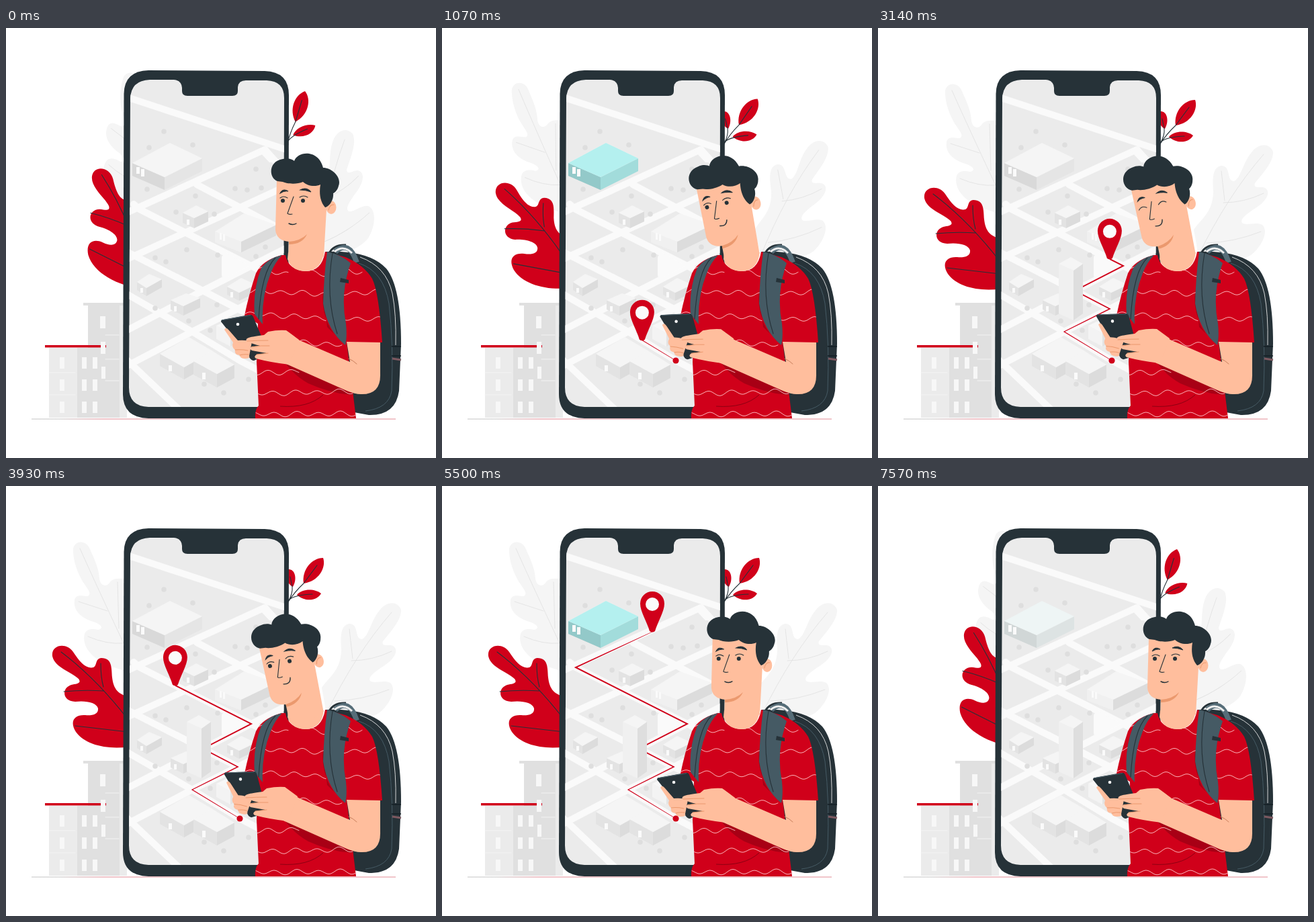
Animation, 640 px wide and 640 px high, one loop 7780 ms. Source, as an HTML page:

```html
<!DOCTYPE html>
<html lang="en">
<head>
<meta charset="utf-8">
<title>City map traveller</title>
<style>
html, body { margin: 0; width: 100%; height: 100%; overflow: hidden; background: #fff; }
svg { display: block; width: 100vw; height: 100vh; }
.red { fill: #d0001a; } .dark { fill: #263238; } .slate { fill: #455a64; }
.skin { fill: #ffbe9d; } .pale { fill: #f5f5f5; }
.ink, .vein, .wave, .road { fill: none; stroke-linecap: round; stroke-linejoin: round; }
.ink { stroke: #263238; stroke-width: 1.1; }
.vein { stroke: #e3e3e3; stroke-width: .9; }
.wave { stroke: #ffc4c8; stroke-width: .9; }
.road { stroke: #fafafa; stroke-width: 10; }
.crease { fill: none; stroke: #eb996e; stroke-width: 1; stroke-linecap: round; }
</style>
</head>
<body>
<svg viewBox="0 0 640 640">
<defs>
  <clipPath id="screenClip"><path id="screenShape" d="M214 77L250 77Q261 78 262 89V94Q262 101 270 101H337Q345 101 345 94V88Q346 78 357 78H388Q414 79 414 104L413 564H212Q183 563 183 535L185 105Q186 78 214 77Z"/></clipPath>
  <clipPath id="shirtClip"><path id="shirtShape" d="M410 338Q381 346 372 365Q361 398 355 428L375 440L373 497L376 562Q370 568 371 581H521L516 540L507 468L560 468Q555 393 545 373Q532 352 505 341L475 333Q470 362 446 362Q420 360 416 338Z"/></clipPath>
  <mask id="trim" maskUnits="userSpaceOnUse" width="640" height="640">
    <polyline id="trimLine" fill="none" stroke="#fff" stroke-width="7" stroke-miterlimit="8"/>
  </mask>
  <linearGradient id="groundInk"><stop offset=".08" stop-color="#c4c4c4"/><stop offset=".2" stop-color="#e38b95"/><stop offset="1" stop-color="#e38b95"/></linearGradient>
</defs>

<g id="greyLeft">
  <path class="pale" d="M100 98C98 82 117 78 124 92C132 110 138 122 139 138C141 150 150 150 154 144C160 136 168 138 180 138L215 300C190 275 170 274 155 268C130 258 112 240 117 220C120 212 130 212 137 214C146 212 142 206 130 202C110 196 100 184 102 170C104 160 114 164 122 164C128 160 122 154 114 142C106 128 101 114 100 98Z"/>
  <path class="vein" d="M110 93Q140 160 185 255M108 172L151 186M122 224Q150 236 174 234M166 143L168 212"/>
</g>
<g id="greyRight">
  <path class="pale" d="M478 345L470 300C480 285 498 275 499 245C498 225 497 207 511 205C526 205 518 228 530 228C540 224 543 200 556 185C566 172 582 170 588 184C589 200 572 217 561 231C558 240 570 235 576 238C586 244 578 258 562 268C550 276 538 284 542 290C548 295 562 288 572 293C582 302 572 325 555 338C535 350 510 345 478 345Z"/>
  <path class="vein" d="M574 188Q520 250 476 340M511 213L516 257M574 246Q545 260 514 260M570 303Q530 319 489 320"/>
</g>

<g id="city">
  <path fill="#e0e0e0" d="M115 409H180V413H170V580H122V413H115Z"/>
  <path fill="#ebebeb" d="M169 413H180V580H169ZM64 476H106V580H64Z"/>
  <path fill="#e0e0e0" d="M106 476H148V580H106Z"/>
  <path class="vein" style="stroke:#f5f5f5" d="M64 513H103M64 546H103M148 493H168M148 457H168M148 525H168"/>
  <path class="red" d="M58 472H149V475.500H58Z"/>
</g>
<path fill="none" stroke="url(#groundInk)" d="M38 582L580 582.01"/>

<g id="sprig">
  <path class="red" d="M443 145C440 125 455 107 472 107C477 122 465 142 443 145ZM433 162C442 152 460 153 469 160C463 171 445 173 433 162ZM427 150C416 145 413 125 421 124C430 124 434 138 427 150Z"/>
  <path class="ink" d="M419 174Q429 158 443 145L463 118M423 168Q432 162 456 161M420 172Q427 160 426 150L423 135"/>
</g>
<g id="redLeaf">
  <path class="red" d="M69 253C67 236 90 232 100 247C108 259 118 273 130 270C136 268 132 257 142 256C158 256 157 270 158 285C160 302 167 311 185 314L200 385C160 395 120 388 104 366C94 350 102 340 118 341C128 342 138 340 137 331C135 322 118 319 103 321C84 321 82 301 97 296C105 294 113 294 108 287C98 277 72 270 69 253Z"/>
  <path class="ink" d="M82 247Q135 287 182 348M86 306Q115 303 146 305M103 357L190 367M141 264Q141 285 145 299"/>
</g>

<path class="dark" d="M212 63L385 64Q421 65 421 100L420 581H212Q174 580 174 545L175.500 98Q176 64 212 63Z"/>
<use href="#screenShape" fill="#ebebeb"/>
<g clip-path="url(#screenClip)">
  <path class="road" d="M180 103L420 182M180 275L385 181L425 224M190 262L199 270L420 382M284 233L420 305M180 344L355 264L420 234M180 450L293 391L365 354L420 326M180 333L293 391L345 418L380 436M180 503L277 452L345 418L420 380M180 396L277 452L348 495L390 517M180 494L262 572M326 342V368"/>
  <path fill="#fafafa" d="M326 334L362 354L326 372ZM375 182L388 176L408 200H392Z"/>
  <g id="trees" fill="#dedede"></g>
  <g id="houses"></g>
  <g id="glow"></g>
  <g id="doors" fill="#fafafa"></g>
</g>
<g class="red">
  <g mask="url(#trim)"><polygon id="route"/></g>
  <circle id="dot" cx="348" cy="495"/>
  <g id="pin">
    <path d="M-4-1Q0 2 4-1C8-15 18-30 18-42A18 18 0 0 0-18-42C-18-30-8-15-4-1Z"/>
    <circle cy="-41" r="10" fill="#fafafa"/>
  </g>
</g>
<g id="tower"></g>

<g id="backpack">
  <path class="dark" d="M475 333Q540 330 566 358Q588 385 588 470L585 540Q580 577 540 576L518 572L500 450Z"/>
  <path fill="none" stroke="#455a64" d="M525 350Q562 362 570 410Q577 470 574 540Q570 566 535 570"/>
  <path fill="none" stroke="#e8e8e8" stroke-width=".9" d="M527 341Q566 355 575 395Q581 425 580 472"/>
  <path d="M574 474H588M574 488H588" stroke="#151f24" stroke-width="1.500"/>
  <path d="M575 492L588 494" stroke="#7d5960" stroke-width="3"/>
  <path fill="none" stroke="#263238" stroke-width="3" d="M481 335Q488 322 506 323"/>
  <path fill="none" stroke="#566d78" stroke-width="8" d="M490 333Q511 315 522 349"/>
  <path fill="none" stroke="#eeeeee" stroke-width="3" d="M489 333Q502 322 515 335"/>
</g>
<use href="#shirtShape" class="red"/>
<g clip-path="url(#shirtClip)">
  <path fill="#a80015" d="M412 494L520 538V546Q488 546 450 529Q428 517 412 494ZM472 390Q466 440 505 472L478 445Z"/>
  <g id="waves" class="wave"></g>
  <path fill="none" stroke="#8c0012" d="M408 563Q450 566 472 546"/>
</g>
<path class="slate" d="M411 338Q391 342 380 357Q367 390 370 426L382 441Q380 400 394 365Q400 349 411 338ZM478 333Q473 370 472 410Q478 450 505 472Q508 460 506 440Q497 395 513 350Q500 338 478 333Z"/>
<path class="ink" d="M401 342Q380 362 376 433M486 335Q475 400 493 455"/>
<path class="dark" d="M498 372L510 375V380L497 378Z"/>

<path class="skin" d="M420 334L419 344Q425 362 447 362Q470 360 473 334Z"/>
<g id="head">
  <path class="skin" d="M403 226L401 300Q402 316 421 318L420 345Q445 358 473 340L477 270L472 226Z"/>
  <ellipse class="skin" cx="484" cy="267" rx="7.500" ry="10"/>
  <path class="crease" d="M480 271Q482 262 488 263"/>
  <path fill="#eb996e" d="M421 318Q438 317 448 307Q441 322 421 322Z"/>
  <path class="dark" d="M404 228C390 222 391 198 412 195C420 193 427 196 429 198C434 183 465 180 472 208C485 208 500 222 495 235C494 240 490 245 487 246C488 256 481 266 475 267C467 258 466 245 468 233C460 237 448 235 442 229C433 233 418 232 412 229Z"/>
  <path class="dark" d="M408 246Q412 238 420 243Q414 242 408 246ZM438 241Q447 236 454 244Q446 241 438 241Z" stroke="#263238"/>
  <path class="ink" stroke-width="1.300" d="M428 251L419 276Q421 278 426 277"/>
  <g id="eyesOpen">
    <circle class="dark" cx="412" cy="257" r="3"/><circle class="dark" cx="442" cy="257" r="3"/>
    <path class="ink" d="M408 253Q413 249 419 253M437 252Q443 248 449 252"/>
  </g>
  <path id="eyesShut" class="ink" d="M407 259Q412 253 419 258M437 258Q443 252 449 257"/>
  <path id="mouth" class="ink" style="stroke-width:1.400"/>
</g>

<g id="phone">
  <path class="dark" d="M320 437Q320 434 323 434L362 427Q366 426 368 430L391 485L369 495Q365 495 362 490Z"/>
  <path fill="none" stroke="#455a64" d="M321 435L364 427.500"/>
  <circle cx="345" cy="441" r="2.300" fill="#fafafa"/>
  <path class="skin" d="M325 449Q327 444 332 450L345 465Q358 464 366 467L362 488Q364 492 356 492Q348 492 348 487Q339 486 341 479Q335 475 338 468Z"/>
  <path class="crease" d="M341 479Q350 478 360 480M348 487Q354 485 361 486"/>
</g>
<path class="skin" d="M507 467L557 468V515Q558 546 528 545Q518 545 505 539L408 496L418 451Q428 458 435 464L512 497Z"/>
<path class="crease" style="stroke:#c97f5c" d="M510 492Q517 495 522 500"/>
<g id="hand">
  <path class="skin" d="M358 466C356 461 362 460 384 457L390 452Q405 449 417 450L436 464L422 501Q395 498 372 492Q368 489 373 486L388 484L366 480Q361 477 366 474L378 473Q366 470 358 466Z"/>
  <path class="crease" d="M359 466Q375 465 390 465M366 475Q380 472 392 473M373 486L390 484"/>
</g>
</svg>

<script>
const LOOP = 7780;
const $ = id => document.getElementById(id);
const set = (id, name, value) => $(id).setAttribute(name, value);
const poly = (points, fill) => `<polygon points="${points.join(' ')}" fill="${fill}"/>`;
const rect = (x, y, w, h) => `<rect x="${x}" y="${y}" width="${w}" height="${h}"/>`;
const GREYS = ['#f5f5f5', '#e3e3e3', '#dcdcdc'];

// Isometric block: left, back, right and front corners of the roof, then wall height.
function block(l, b, r, f, h, [top, left, right] = GREYS) {
  const drop = ([x, y]) => [x, y + h];
  return poly([l, f, drop(f), drop(l)], left) + poly([f, r, drop(r), drop(f)], right) + poly([l, b, r, f], top);
}
const hall = [[188, 201], [244, 171], [292, 194], [236, 222], 19];

$('trees').innerHTML = [
  [235, 154], [213, 178], [278, 174], [210, 240], [282, 250], [253, 274], [310, 277], [341, 239],
  [359, 241], [372, 210], [380, 238], [222, 342], [238, 348], [269, 330], [222, 417], [272, 436],
  [314, 412], [304, 450], [372, 340], [386, 326], [295, 530], [324, 543], [361, 523], [315, 338]
].map(([x, y]) => `<circle cx="${x}" cy="${y}" r="3.8"/>`).join('');

$('houses').innerHTML =
  block(...hall, ['#f5f5f5', '#d9d9d9', '#e5e5e5']) +
  block([263, 275], [283, 264], [301, 273], [280, 283], 15) +
  block([311, 303], [354, 276], [402, 293], [350, 318], 16, ['#f5f5f5', '#f0f0f0', '#dcdcdc']) +
  block([195, 378], [213, 366], [232, 374], [209, 387], 12) +
  block([245, 405], [268, 395], [289, 402], [264, 414], 14) +
  block([329, 385], [350, 372], [372, 382], [347, 394], 12) +
  block([313, 443], [332, 434], [352, 444], [334, 454], 20, ['#f7f7f7', '#f3f3f3', '#e3e3e3']) +
  block([229, 485], [272, 460], [308, 481], [265, 505], 18) +
  block([279, 496], [306, 480], [340, 501], [314, 515], 20);
$('glow').innerHTML = block(...hall, ['#b4f0ef', '#93c9c9', '#a2dcdb']);
$('tower').innerHTML = block([269, 351], [287, 341], [305, 351], [291, 361], 74, ['#f5f5f5', '#f0f0f0', '#dedede']);
$('doors').innerHTML = [
  [194, 207, 5, 10], [201, 210, 5, 11], [269, 285, 4, 8], [318, 305, 3, 10], [323, 307, 3, 10],
  [200, 387, 4, 7], [250, 414, 4, 8], [334, 393, 4, 8], [242, 502, 5, 9], [292, 513, 5, 10]
].map(d => rect(...d)).join('');

let windows = rect(140, 429, 8, 18) + rect(141, 467, 7, 18) + rect(142, 504, 6, 18);
for (const y of [490, 523, 556])
  for (const x of [80, 113, 129]) windows += rect(x, y, 7, 17);
$('city').innerHTML += `<g fill="#f7f7f7">${windows}</g>`;

function wave(x0, y0, x1, y1) {
  let d = '';
  for (let x = x0; x <= x1; x += 2) {
    const y = y0 + (y1 - y0) * (x - x0) / (x1 - x0) + 3.2 * Math.sin(x / 5.2 + y0) + Math.sin(x / 9);
    d += `${d ? 'L' : 'M'}${x} ${y.toFixed(1)}`;
  }
  return `<path d="${d}"/>`;
}
$('waves').innerHTML = [
  [372, 358, 420, 366], [455, 363, 475, 366], [362, 391, 474, 396], [502, 360, 530, 363],
  [502, 395, 552, 393], [356, 425, 476, 432], [502, 432, 560, 434], [410, 466, 500, 472],
  [374, 514, 436, 511], [374, 544, 516, 541], [372, 575, 520, 574]
].map(w => wave(...w)).join('');

// Route: distances are measured along x, since all legs share nearly one slope.
const route = [[348, 495], [277, 452], [345, 418], [293, 391], [365, 354], [199, 270], [313, 217]];
const widths = [.4, .6, .8, .9, 1, 1, .25];
const marks = [0];
for (let i = 1; i < route.length; i++) marks.push(marks[i - 1] + Math.abs(route[i][0] - route[i - 1][0]));
const END = marks[marks.length - 1];

function outline() {
  const unit = i => {
    const dx = route[i + 1][0] - route[i][0], dy = route[i + 1][1] - route[i][1], n = Math.hypot(dx, dy);
    return [-dy / n, dx / n];
  };
  const near = [], far = [];
  route.forEach(([x, y], i) => {
    const a = unit(Math.max(0, i - 1)), b = unit(Math.min(i, route.length - 2));
    const k = widths[i] / (1 + a[0] * b[0] + a[1] * b[1]);
    const ox = (a[0] + b[0]) * k, oy = (a[1] + b[1]) * k;
    near.push([x + ox, y + oy]);
    far.unshift([x - ox, y - oy]);
  });
  return near.concat(far).join(' ');
}
set('route', 'points', outline());

function along(d) {
  let i = 1;
  while (i < route.length - 1 && d > marks[i]) i++;
  const k = (d - marks[i - 1]) / (marks[i] - marks[i - 1]);
  return route[i].map((v, axis) => route[i - 1][axis] + (v - route[i - 1][axis]) * k);
}
const slice = (a, b) => [along(a), ...route.filter((_, i) => marks[i] > a && marks[i] < b), along(b)];

const ramp = (t, a, b) => Math.min(1, Math.max(0, (t - a) / (b - a)));
const ease = (t, a, b) => { const u = ramp(t, a, b); return u * u * (3 - 2 * u); };
const swing = (t, a, b, c, d) => ease(t, a, b) - ease(t, c, d);
const mix = (a, b, k) => a + (b - a) * k;
const turn = (id, angle, x, y) => set(id, 'transform', `rotate(${angle} ${x} ${y})`);

const times = [560, 1070, 2140, 3140, 3930, 4710, 5470];
const travel = [0, 50, 165, 283, 376, 461, END];
function reached(t) {
  let d = 0;
  for (let i = 1; i < times.length; i++) d += (travel[i] - travel[i - 1]) * ramp(t, times[i - 1], times[i]);
  return d;
}

function draw(t) {
  turn('redLeaf', 20 * (1 - swing(t, 0, 1500, 6000, 7500)), 193, 404);
  turn('greyLeft', 19.3 * (1 - swing(t, 0, 1250, 5900, 7500)), 198, 304);
  turn('greyRight', -20.5 * (1 - swing(t, 0, 1500, 5800, 7450)), 478, 370);
  turn('sprig', -20 * (1 - swing(t, 0, 1320, 6180, 7550)), 422, 177);

  const tilt = swing(t, 0, 1300, 4750, 5550);
  turn('head', -14 * tilt, 447, 340);
  turn('phone', 8 * tilt, 380, 467);
  set('hand', 'transform', `translate(${-2 * tilt} ${-2 * tilt})`);
  const m = (a, b) => mix(a, b, tilt);
  set('mouth', 'd', `M${m(421, 425)} ${m(291, 288)}Q${m(427, 435)} ${m(294, 291)} ${m(432, 437)} ${m(291, 281)}`);
  const shut = t > 2950 && t < 3450;
  set('eyesOpen', 'visibility', shut ? 'hidden' : 'visible');
  set('eyesShut', 'visibility', shut ? 'visible' : 'hidden');

  const head = reached(t), tail = END * ease(t, 5900, 7100);
  set('trimLine', 'points', head > tail ? slice(tail, head).join(' ') : '');
  set('dot', 'r', 4.6 * swing(t, 400, 650, 6850, 7150));
  const [x, y] = along(head);
  set('pin', 'transform', `translate(${x} ${y}) scale(${swing(t, 500, 800, 5550, 5900)})`);

  set('glow', 'opacity', swing(t, 500, 900, 1300, 1700) + swing(t, 5150, 5500, 7000, 7720));
  set('tower', 'transform', `translate(0 434) scale(1 ${ease(t, 1450, 1950)}) translate(0 -434)`);
}

const start = performance.now();
function frame() {
  draw((performance.now() - start) % LOOP);
  requestAnimationFrame(frame);
}
draw(0);
requestAnimationFrame(frame);
</script>
</body>
</html>
```
